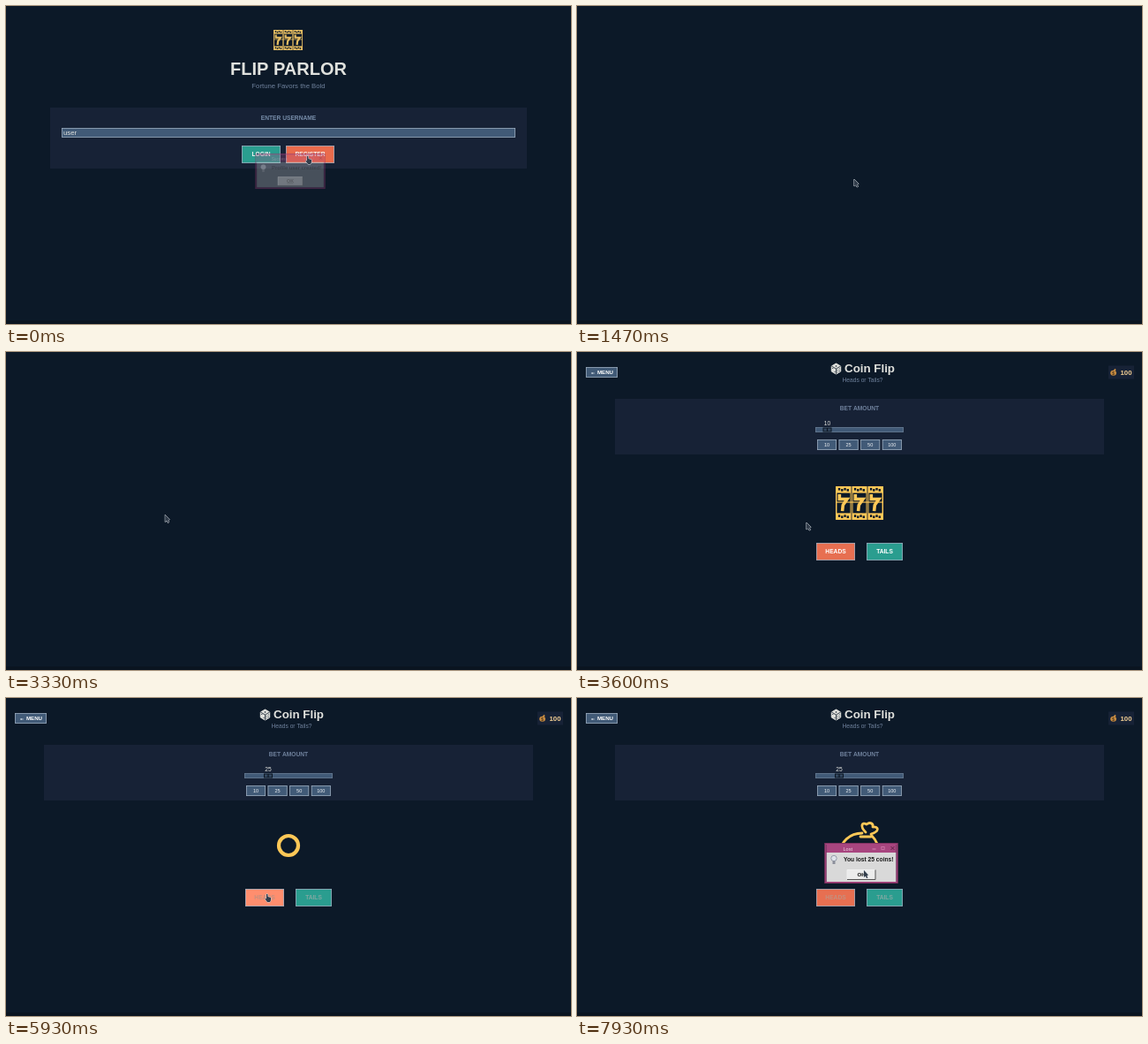
Animation, 640 px wide and 360 px high, one loop 7.99 s. Source, as an HTML page with a canvas:

```html
<!DOCTYPE html>
<html lang="en">
<head>
<meta charset="utf-8">
<title>Casino demo</title>
<style>
html, body { margin: 0; width: 100%; height: 100%; overflow: hidden; background: #0c1928; }
canvas { display: block; width: 640px; height: 360px; }
</style>
</head>
<body>
<canvas id="stage" width="640" height="360"></canvas>
<script>
const g = document.getElementById('stage').getContext('2d');
const LOOP = 7990;
const BG = '#0c1928', PANEL = '#172236', STEEL = '#415a77', SLATE = '#778da9', LIGHT = '#e0e1dd';
const GOLD = '#ffc857', TEAL = '#2a9d8f', CORAL = '#e76f51', DIM = '#6f819c', SAND = '#e6bd62';
const PT = 10 / 9;

// Cursor stops: time, x, y
const PATH = [
  [0, 341, 170], [250, 341, 170], [780, 323, 196], [950, 323, 196], [1200, 314, 196], [1530, 314, 196],
  [1800, 289, 132], [2420, 289, 132], [2950, 168, 183], [3260, 168, 183], [3570, 260, 193], [3960, 260, 193],
  [4200, 308, 103], [4720, 308, 103], [5300, 295, 222], [6270, 295, 222], [6800, 398, 157], [7080, 398, 157],
  [7650, 325, 195], [LOOP, 325, 195]
];

const clamp = v => Math.max(0, Math.min(1, v));
const ease = v => v * v * (3 - 2 * v);
const inside = (p, x, y, w, h) => p.x >= x && p.x <= x + w && p.y >= y && p.y <= y + h;

function cursorAt(t) {
  const i = PATH.findIndex((p, n) => n && t <= p[0]);
  const [a, b] = [PATH[i - 1], PATH[i]];
  const k = ease((t - a[0]) / (b[0] - a[0]));
  return { x: a[1] + (b[1] - a[1]) * k, y: a[2] + (b[2] - a[2]) * k };
}

function rect(x, y, w, h, color) {
  g.fillStyle = color;
  g.fillRect(x, y, w, h);
}

function frame(x, y, w, h, color, lw = 1) {
  g.strokeStyle = color;
  g.lineWidth = lw;
  g.strokeRect(x + lw / 2, y + lw / 2, w - lw, h - lw);
}

// y is the middle of the capital letters
function text(s, x, y, pt, color, bold = false, align = 'center') {
  const size = pt * PT;
  g.font = `${bold ? 'bold ' : ''}${size}px "Liberation Sans", Arial, sans-serif`;
  g.textAlign = align;
  g.fillStyle = color;
  g.fillText(s, x, y + size * 0.34);
}

function line(points, color, lw = 1, close = false) {
  g.beginPath();
  points.forEach(([x, y]) => g.lineTo(x, y));
  if (close) g.closePath();
  g.strokeStyle = color;
  g.lineWidth = lw;
  g.stroke();
}

function disc(x, y, r, color, lw = 0) {
  g.beginPath();
  g.arc(x, y, r, 0, Math.PI * 2);
  g.fillStyle = g.strokeStyle = color;
  g.lineWidth = lw;
  lw ? g.stroke() : g.fill();
}

function box(x, y, w, h, fill, border = '#98a8b9') {
  rect(x, y, w, h, fill);
  frame(x, y, w, h, border, 0.8);
}

function button(label, x, y, w, h, fill, color = '#f4f6f6', pt = 6) {
  box(x, y, w, h, fill);
  text(label, x + w / 2, y + h / 2, pt, color, true);
}

function arrow(x, y, dir) {
  const tip = x + dir * 1.8;
  line([[x - dir * 1.8, y], [tip, y]], '#dde4ec', 0.7);
  rect(tip - dir - 0.5, y - 0.8, 1, 1.6, '#dde4ec');
}

function reels(x, y, w, h, color, bg = BG) {
  rect(x, y, w, h, color);
  const cell = w / 3;
  for (let i = 0; i < 3; i++) {
    const cx = x + cell * i;
    const at = (px, py) => [cx + cell * px, y + h * py];
    rect(cx + cell * 0.08, y + h * 0.2, cell * 0.84, h * 0.6, bg);
    for (const row of [0.05, 0.85]) {
      for (let k = 0; k < 4; k++) rect(cx + cell * (0.16 + k * 0.18), y + h * (row + (k % 2) * 0.03), cell * 0.13, h * 0.07, bg);
    }
    line([at(0.24, 0.24), at(0.24, 0.38), at(0.72, 0.38), at(0.46, 0.56), at(0.42, 0.74)], color, cell * 0.2);
    if (i) rect(cx - w * 0.008, y, w * 0.016, h, bg);
  }
  rect(x, y + h * 0.46, w, h * 0.03, color);
}

function dice(x, y, r, color, solid) {
  const pts = [...Array(6)].map((_, i) => {
    const a = Math.PI * (i / 3 + 1 / 6);
    return [x + r * Math.cos(a), y + r * Math.sin(a)];
  });
  line(pts, color, 1, true);
  if (solid) { g.fillStyle = color; g.fill(); }
  const ink = solid ? BG : color;
  for (const i of [1, 3, 5]) line([[x, y], pts[i]], ink, 0.8);
  const s = r / 12;
  disc(x, y - 6 * s, 1.6 * s, ink);
  for (const [dx, dy] of [[-7.5, -1], [-3, 6.5], [3, 3], [7.5, 5], [3, 7.5], [7.5, 0]]) disc(x + dx * s, y + dy * s, 1.2 * s, ink);
}

function target(x, y) {
  disc(x, y, 9.7, SAND, 1.6);
  disc(x, y, 4.5, SAND);
  line([[x - 9, y - 9], [x, y]], BG, 2.4);
  line([[x - 10, y - 9], [x, y]], SAND, 1.1);
  line([[x - 8, y - 10], [x - 7, y - 6], [x - 11, y - 6]], SAND, 1);
}

function aceCard(x, y) {
  g.beginPath();
  g.roundRect(x - 8.5, y - 12.5, 17, 25, 2);
  g.strokeStyle = SLATE;
  g.lineWidth = 1.2;
  g.stroke();
  g.beginPath();
  for (let i = 0; i < 10; i++) {
    const a = Math.PI * (i / 5 - 0.5), r = i % 2 ? 2.5 : 6.4;
    g.lineTo(x + r * Math.cos(a), y + r * Math.sin(a));
  }
  g.fillStyle = SLATE;
  g.fill();
}

function smallBag(x, y) {
  g.beginPath();
  g.ellipse(x - 0.4, y + 0.8, 3.4, 3, 0, 0, 7);
  g.fillStyle = '#c98d42';
  g.fill();
  line([[x, y - 1], [x + 2, y - 3.6]], '#c98d42', 1.8);
  text('$', x - 0.4, y + 1, 4, '#3c2a18', true);
}

function bigBag() {
  g.lineJoin = g.lineCap = 'round';
  g.beginPath();
  g.moveTo(323, 153);
  g.bezierCurveTo(309, 153, 298, 163, 298, 176);
  g.bezierCurveTo(298, 193, 342, 193, 342, 176);
  g.bezierCurveTo(342, 168, 339, 161, 334, 156);
  g.moveTo(321, 157);
  g.lineTo(333, 157);
  g.moveTo(327, 152);
  g.bezierCurveTo(320, 145, 323, 140, 328, 143);
  g.bezierCurveTo(332, 140, 336, 142, 335, 146);
  g.bezierCurveTo(342, 145, 343, 151, 333, 154);
  g.strokeStyle = GOLD;
  g.lineWidth = 2.8;
  g.stroke();
  text('$', 320, 174, 16, GOLD, true);
  g.lineJoin = 'miter';
  g.lineCap = 'butt';
}

function balance(x, y) {
  rect(x, y, 29, 15, PANEL);
  smallBag(x + 6, y + 7.5);
  text('100', x + 26.5, y + 7.5, 7, '#f3cf94', true, 'right');
}

function loginScreen() {
  reels(303, 27, 33, 23, SAND);
  text('FLIP PARLOR', 320, 71.5, 18, LIGHT, true);
  text('Fortune Favors the Bold', 320, 90, 7, DIM);
  rect(50, 115, 540, 69, PANEL);
  text('ENTER USERNAME', 320, 126.5, 6, SLATE, true);
  box(63, 138, 514, 11, STEEL);
  text('user', 65, 143, 7, LIGHT, false, 'left');
  button('LOGIN', 267, 158, 44, 20, TEAL);
  button('REGISTER', 317, 158, 55, 20, '#ea6b4c');
}

function gameCard(x, y, w, title, note, color, icon, cursor) {
  const hover = inside(cursor, x, y, w, 88), cx = x + w / 2;
  rect(x, y, w, 88, hover ? '#1f2d4a' : PANEL);
  if (hover) {
    rect(cx - 9, y + 7, 18, 27, PANEL);
    rect(cx - 19.5, y + 36, 39, 13, PANEL);
    rect(cx - 20, y + 50, 40, 8, PANEL);
  }
  icon(cx, y + 21);
  text(title, cx, y + 43, 8, LIGHT, true);
  text(note, cx, y + 54.5, 5, '#66758d');
  box(cx - 20.5, y + 63, 41, 15, color);
  text('PLAY', cx - 13.5, y + 70.5, 6, '#fff', true, 'left');
  arrow(cx + 10.5, y + 71, 1);
}

function navButton(label, x, w, color, icon) {
  box(x, 320.5, w, 19.5, color);
  text(label, x + w - 10.5, 330.5, 6, '#fff', true, 'right');
  icon(x + 14, 330.5);
}

function menuScreen(cursor) {
  rect(10, 11, 31, 14, PANEL);
  disc(18, 15.8, 1.5, SLATE, 0.7);
  line([[16.8, 17.3], [15.7, 21], [20.3, 21], [19.2, 17.3]], SLATE, 0.8, true);
  text('user', 23, 17.5, 6, LIGHT, false, 'left');
  balance(48, 10);
  reels(306, 43, 28, 20, SAND);
  text('CHOOSE YOUR GAME', 320, 79.5, 12, LIGHT, true);

  gameCard(15, 114, 304.5, 'Coin Flip', 'Heads or Tails?', '#48bfb3', (x, y) => dice(x, y, 10, '#48bfb3'), cursor);
  gameCard(329.5, 114, 295.5, 'Slot Machine', 'Spin to Win!', CORAL,
    (x, y) => reels(x - 11, y - 7.5, 22, 15.5, CORAL, PANEL), cursor);
  gameCard(15, 211.5, 304.5, 'Number Guess', 'Guess 1-10', SAND, target, cursor);
  gameCard(329.5, 211.5, 295.5, 'Blackjack', 'Coming Soon', SLATE, aceCard, cursor);

  navButton('STATS', 191.5, 52, '#9b51b6', (x, y) => {
    [3, 5, 4].forEach((h, i) => rect(x - 2.5 + i * 2, y + 3 - h, 1.4, h, '#fff'));
  });
  navButton('ACHIEVEMENTS', 248.5, 83.5, '#e67e22', (x, y) => {
    rect(x - 1.8, y - 3, 3.6, 3.5, '#fff');
    rect(x - 0.5, y, 1, 2.5, '#fff');
    rect(x - 2, y + 2, 4, 1, '#fff');
    line([[x - 3, y - 2], [x - 1.5, y], [x + 1.5, y], [x + 3, y - 2]], '#fff', 0.7);
  });
  navButton('SHOP', 337, 49, '#25a95c', (x, y) => {
    rect(x - 2.8, y - 1.5, 5.6, 4.5, '#fff');
    frame(x - 1.5, y - 3, 3, 3, '#fff', 0.7);
  });
  navButton('LOGOUT', 391, 57, '#e74739', (x, y) => {
    frame(x - 1.8, y - 3, 3.6, 6, '#fff', 0.8);
    rect(x + 0.2, y - 0.3, 0.8, 0.8, '#fff');
  });
}

function coin(t) {
  const spin = Math.floor((t - 5470) / 100) % 3;
  if (t > 6600 || (t > 5470 && spin === 2)) bigBag();
  else if (t > 5470 && spin === 1) disc(320, 167, 11, GOLD, 4.2);
  else reels(293, 152, 54, 38, GOLD);
}

function flipScreen(t, cursor) {
  const bet = t < 4700 ? 10 : 25, locked = t > 5470;
  box(10, 17, 36, 12, STEEL);
  arrow(18, 24, -1);
  text('MENU', 32, 23, 5.5, '#fff', true);
  dice(293.5, 19, 6, LIGHT, true);
  text('Coin Flip', 303, 18.5, 12, LIGHT, true, 'left');
  text('Heads or Tails?', 323.5, 31.5, 6, DIM);
  balance(602, 15.5);

  rect(43, 53, 554, 63, PANEL);
  text('BET AMOUNT', 320, 64, 6, DIM, true);
  const thumb = bet === 10 ? 283.5 : 297;
  text(bet, thumb, 81, 6, LIGHT);
  box(270, 85, 100, 6, STEEL, '#64788f');
  rect(thumb - 5, 85.5, 10, 5, '#0b1522');
  rect(thumb - 4, 86.5, 3.4, 3, '#33475f');
  rect(thumb + 0.6, 86.5, 3.4, 3, '#33475f');
  [10, 25, 50, 100].forEach((n, i) => {
    const x = 272 + i * 24.6, hover = inside(cursor, x, 99, 22, 12);
    box(x, 99, 22, 12, hover ? '#587499' : STEEL);
    text(n, x + 11, 105.2, 5, '#f0f2f4');
  });

  coin(t);
  const hot = inside(cursor, 271, 216, 44, 20);
  button('HEADS', 271, 216, 44, 20, hot ? '#ff8e6e' : CORAL, locked ? '#c4907f' : '#fff');
  button('TAILS', 328, 216, 41, 20, TEAL, locked ? '#7fa8a2' : '#fff');
}

function dialog(title, message, w, alpha, scale, pressed) {
  if (alpha <= 0) return;
  const cx = 322, cy = 187, h = 46, x = cx - w / 2, y = cy - h / 2, by = y + 30.5;
  g.save();
  g.globalAlpha = alpha;
  g.translate(cx, cy);
  g.scale(scale, scale);
  g.translate(-cx, -cy);
  rect(x + 2, y, w - 4, 11, '#a8457f');
  rect(x + 2, y + 11, w - 4, h - 13, '#d9d9d9');
  frame(x, y, w, h, '#a8457f', 2);
  frame(x, y, w, h, '#6d2c55', 0.7);
  text(title, x + 21, y + 6.8, 5, '#f0d4e4', false, 'left');
  line([[x + w - 29, y + 7], [x + w - 25, y + 7]], '#d88db8', 0.9);
  frame(x + w - 19, y + 4, 4, 4, '#d07aac', 0.8);
  line([[x + w - 8, y + 4], [x + w - 4, y + 8]], '#4f1c3c', 0.8);
  line([[x + w - 4, y + 4], [x + w - 8, y + 8]], '#4f1c3c', 0.8);
  disc(x + 10.5, y + 17.5, 3.2, '#dfe3ea');
  disc(x + 10.5, y + 17.5, 3.2, '#83899a', 0.8);
  rect(x + 9, y + 20.5, 3, 3.5, '#8c8f9a');
  text(message, x + 21.5, y + 18.5, 6, '#161616', true, 'left');
  rect(306, by, 32, 11, pressed ? '#ececec' : '#d9d9d9');
  line([[306, by + 11], [306, by], [338, by]], '#f4f4f4', 0.8);
  line([[306, by + 11], [338, by + 11], [338, by]], '#555', 1);
  text('OK', 322, by + 5.3, 5.5, '#111', true);
  if (!pressed) line([[318, by + 8.4], [326, by + 8.4]], '#111', 0.6);
  g.restore();
}

function pointer({ x, y }, hand) {
  const arrowShape = [[0, 0], [0, 8], [1.9, 6.5], [3, 9], [4.4, 8.4], [3.3, 6], [5, 5.4]];
  const handShape = [[0, 0], [1.3, 0], [1.6, 3], [5, 4], [5, 7], [4, 9], [1, 9], [-1.6, 5.6], [-0.9, 4.8], [0, 5.4]];
  line((hand ? handShape : arrowShape).map(([dx, dy]) => [x + dx, y + dy]), '#d5dae0', 1, true);
  g.fillStyle = '#323d4b';
  g.fill();
}

function draw(t) {
  const cursor = cursorAt(t);
  rect(0, 0, 640, 360, BG);
  if (t < 1060) loginScreen();
  else if (t >= 1540 && t < 3270) menuScreen(cursor);
  else if (t >= 3400) flipScreen(t, cursor);
  rect(0, 356, 640, 4, '#0a1420');

  if (t < 1060) {
    const shown = Math.min(clamp(0.28 + t / 180), clamp((1040 - t) / 130));
    dialog('Success', 'Profile user created!', 91, shown, 0.82 + 0.18 * shown, t > 850);
  }
  if (t > 6770) {
    const shown = clamp((t - 6765) / 112);
    dialog('Lost', 'You lost 25 coins!', 83, shown, 0.82 + 0.18 * shown, t > 7700);
  }

  const overButton = t < 300 || (t > 2750 && t < 3270 && inside(cursor, 147, 177, 41, 15)) ||
    (t > 3900 && (inside(cursor, 297, 99, 22, 12) || inside(cursor, 271, 216, 44, 20)));
  pointer(cursor, overButton);
}

const start = performance.now();
function tick() {
  draw((performance.now() - start) % LOOP);
  requestAnimationFrame(tick);
}
tick();
</script>
</body>
</html>
```
